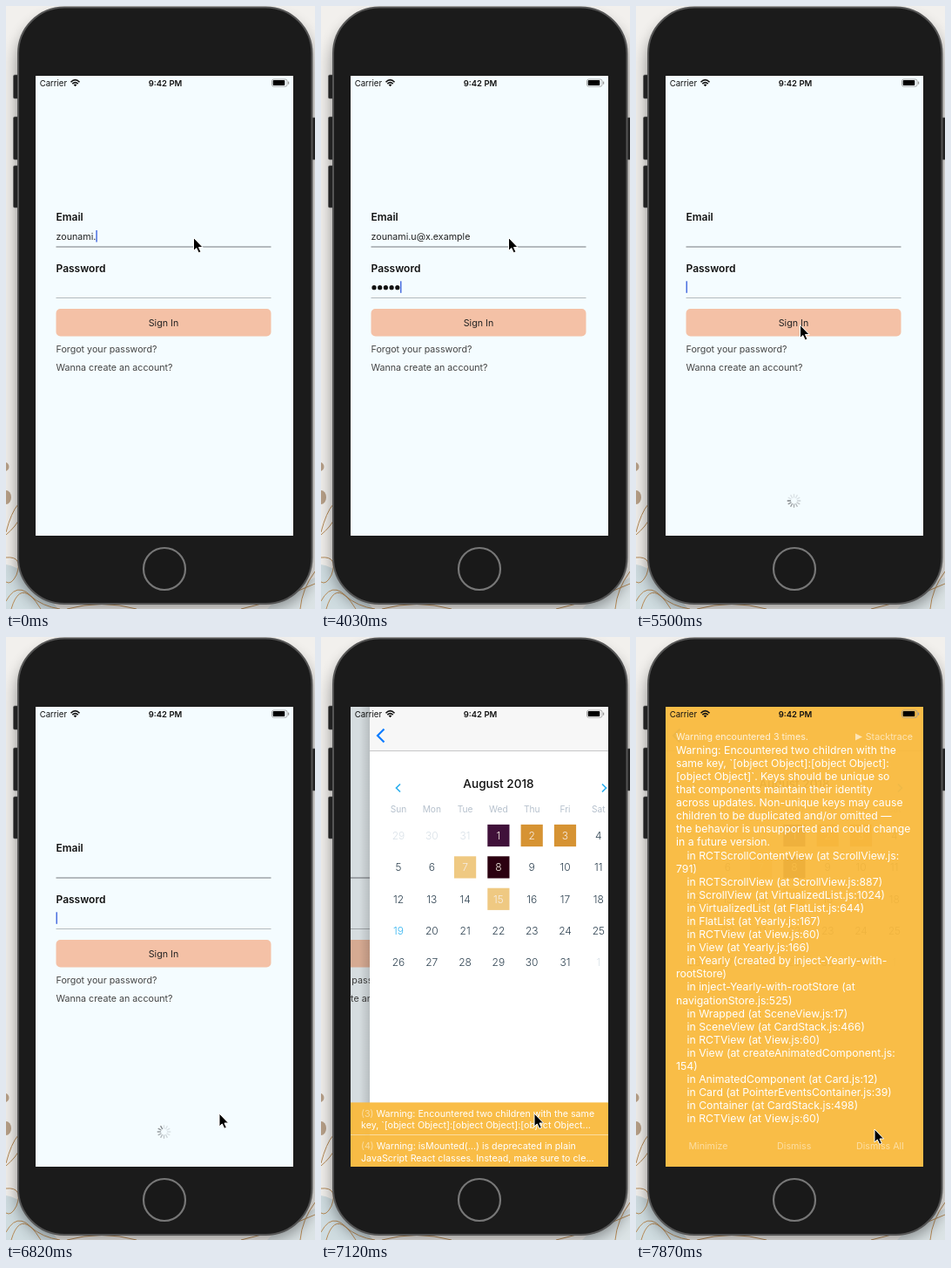
An HTML page that plays this animation: 355x691 px, repeating every 8000 ms.

```html
<!DOCTYPE html>
<html lang="en">
<head>
<meta charset="utf-8">
<title>Sign in</title>
<style>
  html, body { margin: 0; width: 100%; height: 100%; overflow: hidden; background: #eeece9; }
  svg { display: block; }
  text { font-family: Inter, "Open Sans", sans-serif; font-size: 10.7px; }
</style>
</head>
<body>
<svg id="stage" width="355" height="691" viewBox="0 0 355 691"></svg>
<script>
const LOOP = 8000, TICK = 148.6;
const EMAIL = "zounami.u@x.example";

const text = (x, y, str, { size = 10.7, fill = "#fff", weight = 400, anchor = "start", opacity = 1, id = "" } = {}) =>
  `<text ${id && `id="${id}"`} x="${x}" y="${y + size * 0.36}" style="font-size:${size}px" fill="${fill}"
    font-weight="${weight}" text-anchor="${anchor}" opacity="${opacity}">${str}</text>`;
const rect = (x, y, w, h, fill, extra = "") =>
  `<rect x="${x}" y="${y}" width="${w}" height="${h}" fill="${fill}" ${extra}/>`;
const line = (d, stroke, width, extra = "") =>
  `<path d="${d}" fill="none" stroke="${stroke}" stroke-width="${width}" ${extra}/>`;
const range = (n, make) => Array.from({ length: n }, (_, i) => make(i)).join("");

const defs = `<defs>
  <clipPath id="screen"><rect x="34" y="80" width="296" height="527"/></clipPath>
  <linearGradient id="edge"><stop offset="0" stop-opacity="0"/><stop offset="1" stop-opacity=".14"/></linearGradient>
  <filter id="blur" x="-20%" y="-20%" width="140%" height="140%"><feGaussianBlur stdDeviation="9"/></filter>
</defs>`;

const backdrop = rect(0, 0, 355, 691, "#f2f0ed")
  + `<path d="M0 640Q22 642 60 691H0Z" fill="#cfdce0"/><path d="M355 655Q320 670 300 691H355Z" fill="#dbe3e5"/>
     <ellipse cx="-1" cy="528" rx="4.500" ry="5" fill="#b8a088"/><ellipse cx="0" cy="563" rx="6" ry="8" fill="#b8a088"/>`
  + line(`M0 603Q6 580 14 571M0 606Q12 596 16 586M0 632Q20 630 12 652Q6 664 0 660M0 682Q16 652 40 691
    M6 691Q14 664 28 676T62 691M70 691Q110 680 150 691M270 691Q310 682 355 662M338 691Q340 668 355 648`, "#b68a56", 1)
  + rect(13, 14, 340, 676, "#000", `rx="53" opacity=".42" filter="url(#blur)"`);

const phone = [[79, 27], [127, 49], [183, 48]].map(([y, h]) => rect(8.5, y, 7, h, "#222", `rx="1.500" stroke="#555" stroke-width=".6"`)).join("")
  + rect(349, 128, 8, 48, "#222", `stroke="#555" stroke-width=".6"`)
  + rect(14, 1.5, 337.5, 683.5, "#1b1b1b", `rx="53" stroke="#555" stroke-width="2"`)
  + `<circle cx="182" cy="645" r="24" fill="#191919" stroke="#777" stroke-width="2.200"/>`;

const form = `<g id="form">`
  + rect(34, 80, 296, 527, "#f4fcff")
  + text(57.5, 241.4, "Email", { size: 12, weight: 600, fill: "#111" })
  + text(57.5, 264.5, "", { id: "email", fill: "#222" })
  + rect(57.5, 275.5, 247, 1, "#777b7e")
  + text(57.5, 300.4, "Password", { size: 12, weight: 600, fill: "#111" })
  + `<g id="dots">${range(8, i => `<circle cx="${61 + i * 6.7}" cy="322.700" r="2.600" fill="#111"/>`)}</g>`
  + rect(57.5, 334, 247, 1, "#b4babd")
  + rect(0, 0, 1.5, 13.5, "#4a6ee0", `id="caret"`)
  + `<g id="button">${rect(57.5, 347, 247, 31.5, "#f4c1a6", `rx="5"`)}${text(181, 363, "Sign In", { anchor: "middle", fill: "#222" })}</g>`
  + text(57.5, 393.5, "Forgot your password?", { fill: "#444" })
  + text(57.5, 414.5, "Wanna create an account?", { fill: "#444" })
  + `<g id="spinner" transform="translate(181.500 567)">`
  + range(12, i => line("M0 -4V-7.300", "#707478", 1.3, `stroke-linecap="round" transform="rotate(${-i * 30})" opacity="${Math.max(0.2, 0.9 - i * 0.1)}"`))
  + `</g></g>` + rect(34, 80, 296, 527, "#000", `id="dim"`);

const marked = { 1: "#40113a", 2: "#d69333", 3: "#d69333", 7: "#efc982", 8: "#2b0010", 15: "#efc982" };
function day(i) {
  const x = 67 + (i % 7) * 38.3, y = 227.5 + Math.floor(i / 7) * 36.4, n = i - 2;
  const label = n < 1 ? n + 31 : n > 31 ? n - 31 : n;
  const inMonth = n > 0 && n < 32, box = inMonth && marked[n];
  const fill = box ? "#f7eee6" : !inMonth ? "#d9e1e8" : n === 19 ? "#35b5f0" : "#2d4150";
  return (box ? rect(x - 12.6, y - 12.6, 25.2, 25.2, box) : "")
    + text(x, y, label, { size: 12, weight: 300, anchor: "middle", fill });
}
const calendar = `<g id="calendar">`
  + rect(22, 80, 12, 527, "url(#edge)") + rect(34, 80, 296, 527, "#fff")
  + rect(34, 80, 296, 50, "#f7f7f7") + rect(34, 130, 296, 0.8, "#b9b9bb")
  + line("M50.500 105.500L43 113L50.500 120.500", "#0a7cff", 2.2)
  + text(182, 168.5, "August 2018", { size: 13.6, weight: 500, anchor: "middle", fill: "#111" })
  + line("M69 168.500L64.500 173L69 177.500M301 168.500L305.500 173L301 177.500", "#2fb0ee", 1.7)
  + ["Sun", "Mon", "Tue", "Wed", "Thu", "Fri", "Sat"].map((d, i) =>
      text(67 + i * 38.3, 197.5, d, { size: 10.2, anchor: "middle", fill: "#b6c1cd" })).join("")
  + range(35, day) + `</g>`;

const YELLOW = "rgba(249,186,62,.95)";
const warning = (y, count, first, second) => rect(34, y, 296, 36.6, YELLOW)
  + text(46, y + 12.7, `<tspan fill-opacity=".5">(${count})</tspan> ${first}`)
  + text(46, y + 26.2, second);
const warnings = `<g id="warnings">`
  + warning(533.4, 3, "Warning: Encountered two children with the same", "key, `[object Object]:[object Object]:[object Object...")
  + rect(34, 570, 296, 0.8, "#fde0a4")
  + warning(570.8, 4, "Warning: isMounted(...) is deprecated in plain", "JavaScript React classes. Instead, make sure to cle...")
  + `</g>`;

// A leading ">" marks an indented line.
const trace = `Warning: Encountered two children with the
same key, \`[object Object]:[object Object]:
[object Object]\`. Keys should be unique so
that components maintain their identity
across updates. Non-unique keys may cause
children to be duplicated and/or omitted —
the behavior is unsupported and could change
in a future version.
>in RCTScrollContentView (at ScrollView.js:
791)
>in RCTScrollView (at ScrollView.js:887)
>in ScrollView (at VirtualizedList.js:1024)
>in VirtualizedList (at FlatList.js:644)
>in FlatList (at Yearly.js:167)
>in RCTView (at View.js:60)
>in View (at Yearly.js:166)
>in Yearly (created by inject-Yearly-with-
rootStore)
>in inject-Yearly-with-rootStore (at
navigationStore.js:525)
>in Wrapped (at SceneView.js:17)
>in SceneView (at CardStack.js:466)
>in RCTView (at View.js:60)
>in View (at createAnimatedComponent.js:
154)
>in AnimatedComponent (at Card.js:12)
>in Card (at PointerEventsContainer.js:39)
>in Container (at CardStack.js:498)
>in RCTView (at View.js:60)`.split("\n");
const inspector = `<g id="inspector">` + rect(34, 80, 296, 527, YELLOW)
  + text(46, 114.5, "Warning encountered 3 times.", { opacity: 0.8 })
  + `<path d="M252 110.500L260 114.500L252 118.500Z" fill="#fff" opacity=".6"/>`
  + text(318, 114.5, "Stacktrace", { anchor: "end", opacity: 0.6 })
  + trace.map((s, i) => text(s[0] === ">" ? 58.5 : 46, 129.4 + i * 15.09, s.replace(">", ""), { size: 12.25 })).join("")
  + ["Minimize", "Dismiss", "Dismiss All"].map((s, i) =>
      text(83 + i * 98.7, 583, s, { anchor: "middle", opacity: 0.5 })).join("")
  + `</g>`;

const statusBar = text(38.7, 88.3, "Carrier", { size: 9.6, fill: "#111" })
  + text(183, 88.3, "9:42 PM", { size: 9.5, weight: 600, anchor: "middle", fill: "#111" })
  + line("M74.500 87.200Q79.500 82.200 84.500 87.200M76.300 89.200Q79.500 86.200 82.700 89.200", "#111", 1.6)
  + `<path d="M77.600 90.300Q79.500 88.700 81.400 90.300L79.500 92.300Z" fill="#111"/>`
  + rect(305.5, 84, 17.5, 8.2, "none", `rx="2" stroke="#999" stroke-width=".8"`)
  + rect(306.7, 85.1, 13.6, 6, "#000", `rx="1"`) + rect(324, 86.6, 1.2, 3, "#999");

const pointer = `<path id="pointer" d="M0 0V15L3.300 12L5.800 17.300L8.400 16.200L6 11H10.600Z" fill="#000" stroke="#fff" stroke-width="1"/>`;

stage.innerHTML = defs + backdrop + phone
  + `<g clip-path="url(#screen)">${form}${calendar}${warnings}${inspector}${statusBar}</g>` + pointer;

const part = Object.fromEntries([...stage.querySelectorAll("[id]")].map(el => [el.id, el]));
const set = (name, attrs) => { for (const key in attrs) part[name].setAttribute(key, attrs[key]); };
const show = (name, on) => set(name, { visibility: on ? "visible" : "hidden" });
const move = (name, x, y) => set(name, { transform: `translate(${x} ${y})` });

// Ticks at which a key lands in each field
const emailKeys = [1, 3, 5, 7, 8, 9, 10, 12, 13, 13, 14];
const passwordKeys = [20, 22, 23, 25, 27, 28, 29];
const pressed = (keys, tick) => keys.filter(k => k <= tick).length;

const pointerPath = [[0, 215.5, 265.5], [29, 215.5, 265.5], [30, 226, 274], [31, 228, 290], [32, 219, 325], [33, 199, 357],
  [34, 188.5, 365.5], [38, 188.5, 365.5], [39, 208, 420], [40, 232, 500], [41, 246, 552], [43, 245, 546], [50, 245, 546],
  [51, 274, 564], [60, 274, 564]];
function pointerAt(tick) {
  const i = pointerPath.findIndex(p => p[0] > tick);
  const [t0, x0, y0] = pointerPath[i - 1], [t1, x1, y1] = pointerPath[i];
  const k = (tick - t0) / (t1 - t0);
  return [x0 + (x1 - x0) * k, y0 + (y1 - y0) * k];
}

function render(tick) {
  const cleared = tick >= 36, inPassword = tick >= 16;
  part.email.textContent = cleared ? "" : EMAIL.slice(0, 8 + pressed(emailKeys, tick));
  const dotCount = cleared ? 0 : pressed(passwordKeys, tick);
  [...part.dots.children].forEach((dot, i) => dot.setAttribute("visibility", i < dotCount ? "inherit" : "hidden"));
  const caretX = inPassword ? 57.5 + dotCount * 6.7 : 57.5 + part.email.getComputedTextLength();
  move("caret", caretX, inPassword ? 315.3 : 257);
  set("button", { opacity: tick === 35 ? 0.5 : 1 });

  show("spinner", cleared);
  const head = 270 + Math.floor((tick - 37) * TICK * 12 / 1000) * 30;
  set("spinner", { transform: `translate(181.500 567) rotate(${head})` });

  const sliding = tick >= 47, inspecting = tick >= 53;
  const offset = !sliding ? 296 : tick >= 51 ? 0 : 22 * 0.25 ** (tick - 48);
  const progress = 1 - offset / 296;
  move("form", -90 * progress, 0);
  set("dim", { opacity: 0.13 * progress });
  move("calendar", offset, 0);
  show("calendar", sliding);
  show("warnings", sliding && !inspecting);
  show("inspector", inspecting);
  move("pointer", ...pointerAt(tick));
}

let start, shown = -1;
function play(now) {
  start ??= now;
  const tick = Math.floor(((now - start) % LOOP) / TICK + 0.1);
  if (tick !== shown) render(shown = tick);
  requestAnimationFrame(play);
}
render(0);
requestAnimationFrame(play);
</script>
</body>
</html>
```
